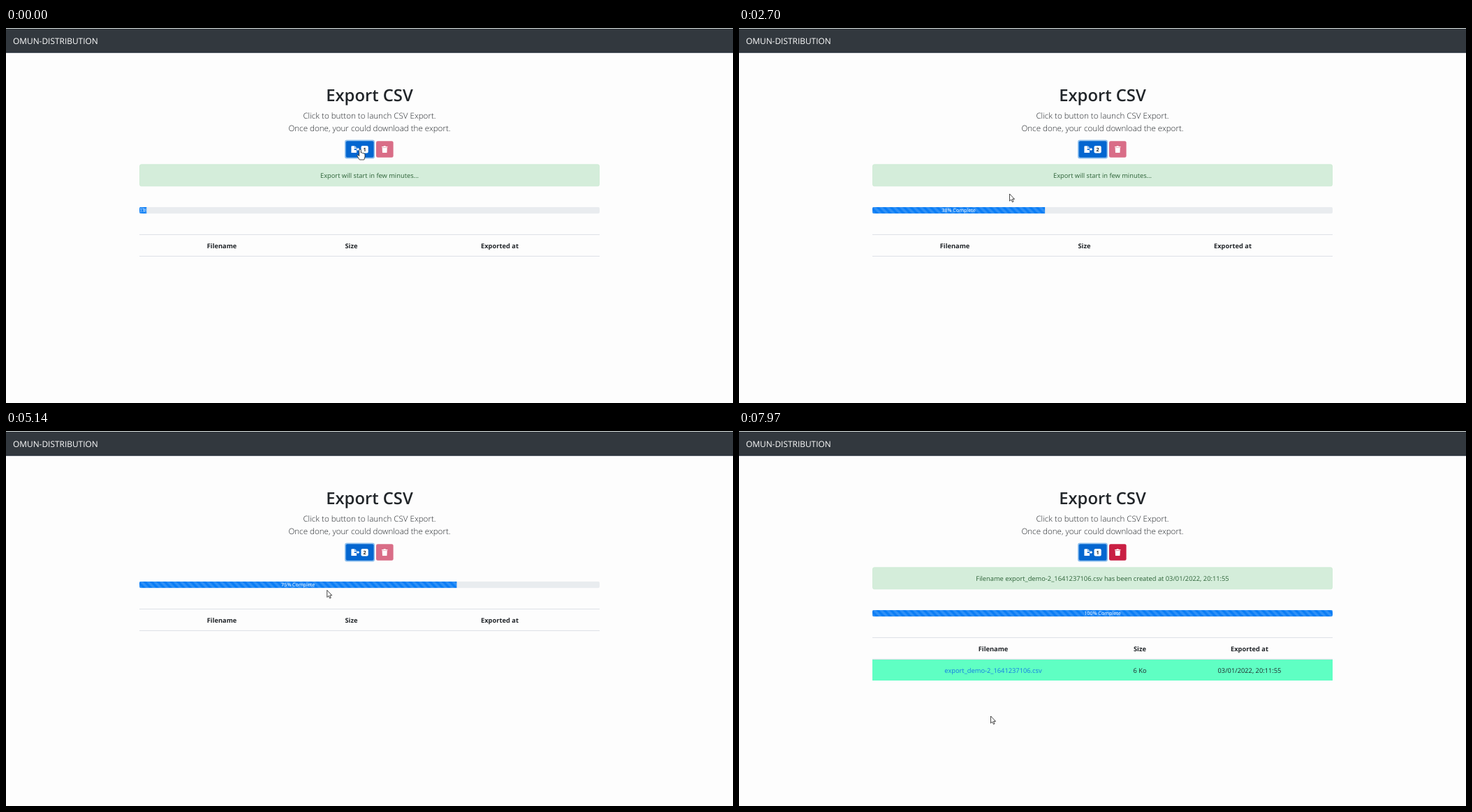
Animation of 1041x538 px, one loop 8000 ms. Source, as an HTML page:

```html
<!DOCTYPE html>
<html lang="en">
<head>
<meta charset="utf-8">
<title>Export CSV</title>
<style>
  html, body { margin: 0; width: 100%; height: 100%; overflow: hidden; background: #fdfdfd; }
  svg { display: block; }
  text { font: 9.3px "Open Sans", "Noto Sans", sans-serif; fill: #212529; text-rendering: geometricPrecision; }
  .mid { text-anchor: middle; }
  .brand { font-size: 11.9px; fill: #fff; }
  .title { font-size: 23.8px; font-weight: 600; }
  .lead { font-size: 11.6px; font-weight: 300; }
  .head { font-weight: 700; }
  .note { fill: #2c6237; }
  .link { fill: #1478e6; }
  .badge { font-size: 7.2px; font-weight: 700; }
  .label { font-size: 7.2px; fill: #fff; }
</style>
</head>
<body>
<svg width="100%" height="100%" viewBox="0 0 1041 538">
  <defs>
    <pattern id="stripes" width="9.5" height="9.5" patternUnits="userSpaceOnUse">
      <path d="M0 4.75L4.75 9.5H0ZM0 0H4.75L9.5 4.75V9.5Z" fill="#fff" fill-opacity=".15"/>
    </pattern>
    <clipPath id="track"><rect width="659" height="9.8" rx="2.4"/></clipPath>
  </defs>

  <rect width="1041" height="538" fill="#fdfdfd"/>
  <rect width="1041" height="1" fill="#dbe3e0"/>
  <rect y="1" width="1041" height="34.5" fill="#32383e"/>
  <rect y="34.5" width="1041" height="1" fill="#222c38"/>
  <text class="brand" x="10" y="22.8">OMUN-DISTRIBUTION</text>

  <text class="title mid" x="520.5" y="105">Export CSV</text>
  <text class="lead mid" x="520.5" y="129.5">Click to button to launch CSV Export.</text>
  <text class="lead mid" x="520.5" y="148">Once done, your could download the export.</text>

  <!-- export button -->
  <rect x="485" y="160.6" width="43" height="26.8" rx="3.2" fill="#8fc0ee"/>
  <rect x="486.7" y="162.2" width="39.8" height="23.6" rx="2" fill="#0466d0"/>
  <path d="M495 169.3H499.2V172H502V173.2H498.6V175H502V178.9H494.4V169.9ZM499.8 169.3L502 171.4H499.8ZM502 173.2H503.4V171.6L506.3 174.1L503.4 176.6V175H502Z" fill="#fff"/>
  <rect x="508.5" y="169" width="10.2" height="10.5" rx="2" fill="#fff"/>
  <text id="count" class="badge mid" x="513.6" y="176.9"></text>

  <!-- delete button -->
  <rect id="trash" x="530" y="162.2" width="24.6" height="23.6" rx="2.3"/>
  <path d="M538 169.9H540.4L540.9 169.2H543.4L543.9 169.9H546.4V171.2H538ZM538.6 171.8H545.8L545.4 178.9H539Z" fill="#fff"/>

  <g id="alert">
    <rect x="191.5" y="195.8" width="658" height="31" rx="2.2" fill="#d4edda" stroke="#c8e8cf" stroke-width=".7"/>
    <text id="note" class="note mid" x="520.5" y="215"></text>
  </g>

  <g id="lower">
    <g transform="translate(191 256.7)" clip-path="url(#track)">
      <rect width="659" height="9.8" fill="#e9ecef"/>
      <svg id="bar" height="9.8" overflow="hidden">
        <rect width="659" height="9.8" fill="#0a7df5"/>
        <rect width="659" height="9.8" fill="url(#stripes)"/>
        <text id="label" class="label" y="7.6"></text>
      </svg>
    </g>
    <path d="M191 296.4H850M191 327.4H850" stroke="#dcdfe6"/>
    <text class="head mid" y="315.5">Filename</text>
    <text class="head mid" y="315.5">Size</text>
    <text class="head mid" y="315.5">Exported at</text>
    <g id="row">
      <rect x="191" y="328" width="659" height="30" fill="#5fffc3"/>
      <text class="link mid" x="364" y="346.5">export_demo-2_1641237106.csv</text>
      <text class="mid" x="574" y="346.5">6 Ko</text>
      <text class="mid" x="731" y="346.5">03/01/2022, 20:11:55</text>
    </g>
  </g>

  <g id="pointer" stroke="#1b1b1b" stroke-width=".8" stroke-linejoin="round" fill="#fff">
    <path id="arrow" d="M0 0V10.2L2.3 8.1L3.9 11.7L5.5 11L4 7.5H7Z"/>
    <path id="hand" d="M-1.3 1.2Q-1.2 0 0 0T1.3 1.2V5Q3 4.2 3.5 5.6Q5 5 5.5 6.3Q7 6 7 7.6V10.8L5.8 15H-.8L-4 9.7Q-4.6 8.1-3.1 8.1L-1.3 9.6Z"/>
  </g>
</svg>

<script>
const LOOP = 8000, DONE = 7758, ALERT_END = 3700, WIDTH = 659;
const $ = id => document.getElementById(id);
const heads = document.querySelectorAll('.head');

// start time and progress in eighths is given by the position in the list
const steps = [-70, 890, 1830, 2970, 4050, 4960, 5870, 6813];

// time, x, y of the pointer tip
const path = [
  [0, 507, 174], [60, 505, 176], [970, 323.5, 217], [2700, 387.5, 238],
  [4400, 477, 206], [5910, 441.5, 252], [7170, 384, 404], [7450, 360.5, 409], [LOOP, 360.5, 409]
];

// cubic-bezier(.25, .1, .25, 1)
function ease(x) {
  if (x >= 1) return 1;
  let lo = 0, hi = 1, u;
  for (let i = 0; i < 24; i++) {
    u = (lo + hi) / 2;
    if (.75 * u * (1 - u) + u ** 3 < x) lo = u; else hi = u;
  }
  return .3 * u * (1 - u) ** 2 + 3 * u * u * (1 - u) + u ** 3;
}

function pointerAt(t) {
  const i = path.findIndex(p => p[0] > t);
  const [t0, x0, y0] = path[i - 1], [t1, x1, y1] = path[i];
  const k = (t - t0) / (t1 - t0), s = k * k * (3 - 2 * k);
  return [x0 + (x1 - x0) * s, y0 + (y1 - y0) * s];
}

const show = (id, on) => $(id).setAttribute('visibility', on ? 'visible' : 'hidden');

function setText(id, value) {
  if ($(id).textContent !== value) $(id).textContent = value;
}

function drawBar(t) {
  const n = steps.filter(s => s <= t).length;
  const width = WIDTH * (n - 1 + ease((t - steps[n - 1]) / 600)) / 8;
  setText('label', Math.round(n * 12.5) + '% Complete');
  $('bar').setAttribute('width', width);
  $('label').setAttribute('x', Math.max(0, (width - $('label').getComputedTextLength()) / 2));
}

function draw(t) {
  const done = t >= DONE, alert = done || t < ALERT_END;
  drawBar(t);
  setText('count', t >= steps[2] && !done ? '2' : '1');
  setText('note', done
    ? 'Filename export_demo-2_1641237106.csv has been created at 03/01/2022, 20:11:55'
    : 'Export will start in few minutes...');
  show('alert', alert);
  show('row', done);
  $('trash').setAttribute('fill', done ? '#c91f43' : '#d96d87');
  $('lower').setAttribute('transform', `translate(0 ${alert ? 0 : -41})`);
  const columns = done ? [364, 574, 731] : [309, 494.5, 707];
  heads.forEach((h, i) => h.setAttribute('x', columns[i]));

  $('pointer').setAttribute('transform', `translate(${pointerAt(t)})`);
  show('hand', t < 150);
  show('arrow', t >= 150);
}

const start = performance.now();
function tick() {
  draw((performance.now() - start) % LOOP);
  requestAnimationFrame(tick);
}
tick();
</script>
</body>
</html>
```
